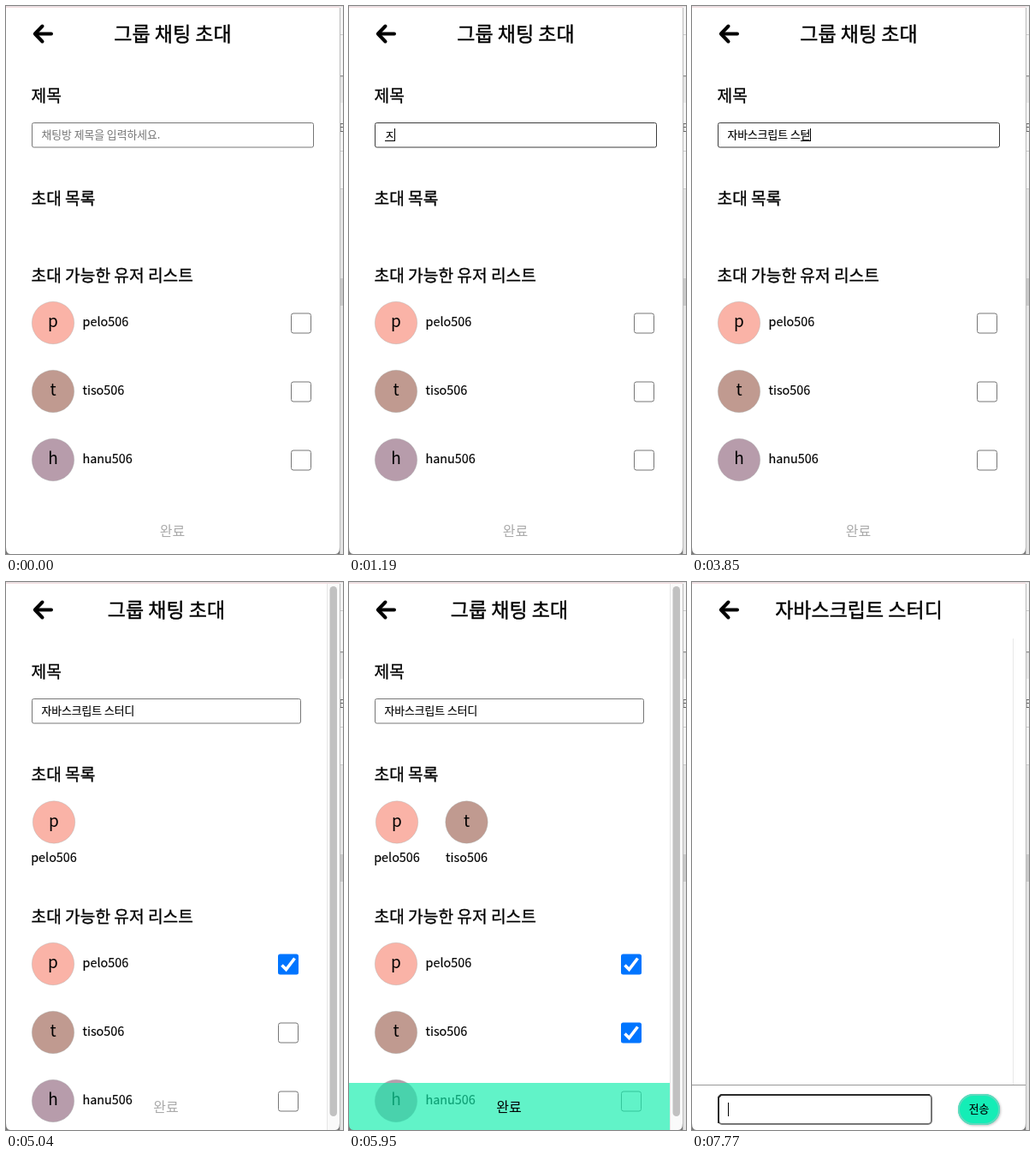
An HTML page with a canvas that plays this animation: 394 by 640 pixels, repeating every 8000 ms.

```html
<!DOCTYPE html>
<html lang="ko">
<head>
<meta charset="utf-8">
<style>
  html, body { margin: 0; width: 100%; height: 100%; overflow: hidden; background: #fff; }
  canvas { display: block; }
</style>
</head>
<body>
<canvas id="stage" width="394" height="640"></canvas>
<script>
const ctx = document.getElementById('stage').getContext('2d');
const FAMILY = '"Noto Sans CJK KR", "Noto Sans CJK", "Noto Sans KR", sans-serif';
const LOOP = 8000;
const ROOM = '자바스크립트 스터디';
const USERS = [
  { name: 'pelo506', color: '#fab3a7' },
  { name: 'tiso506', color: '#c09a90' },
  { name: 'hanu506', color: '#b79cab' },
];
const FOCUS = 910, BLUR = 4270, FIRST_PICK = 5040, SECOND_PICK = 5950;
const PRESS = 7210, CHAT = 7280, CARET_ON = 7770;

// Input contents while Hangul syllables are being composed
const TYPING = [
  [1120, 'ㅈ'], [1680, '자'], [1820, '잡'], [1890, '자바'], [2100, '자밧'],
  [2240, '자바스'], [2310, '자바슼'], [2380, '자바스크'], [2520, '자바스클'],
  [2590, '자바스크리'], [2660, '자바스크립'], [2870, '자바스크립ㅌ'],
  [3010, '자바스크립트'], [3080, '자바스크립트 '], [3150, '자바스크립트 ㅅ'],
  [3500, '자바스크립트 스'], [3640, '자바스크립트 슽'], [3780, '자바스크립트 스터'],
  [3850, '자바스크립트 스턷'], [3990, ROOM],
];

function rect(x, y, w, h, color) {
  ctx.fillStyle = color;
  ctx.fillRect(x, y, w, h);
}

function box(x, y, w, h, r, stroke, fill, width = 1) {
  ctx.beginPath();
  ctx.roundRect(x, y, w, h, r);
  if (fill) { ctx.fillStyle = fill; ctx.fill(); }
  if (stroke) { ctx.strokeStyle = stroke; ctx.lineWidth = width; ctx.stroke(); }
}

function line(points, color, width) {
  ctx.beginPath();
  points.forEach(([x, y]) => ctx.lineTo(x, y));
  ctx.strokeStyle = color;
  ctx.lineWidth = width;
  ctx.stroke();
}

// y is the visual middle of a Hangul syllable; weight thickens the strokes
function text(str, x, y, size, { color = '#000', align = 'left', weight = 0 } = {}) {
  ctx.font = `400 ${size}px ${FAMILY}`;
  ctx.textAlign = align;
  ctx.fillStyle = ctx.strokeStyle = color;
  const base = Math.round(y + size * 0.37);
  ctx.fillText(str, x, base);
  if (weight) {
    ctx.lineWidth = weight;
    ctx.strokeText(str, x, base);
  }
}

function avatar(user, x, y) {
  ctx.beginPath();
  ctx.arc(x, y, 24.7, 0, Math.PI * 2);
  ctx.fillStyle = user.color;
  ctx.fill();
  ctx.strokeStyle = 'rgba(160,170,165,.5)';
  ctx.lineWidth = 0.7;
  ctx.stroke();
  text(user.name[0], x, y - 2, 19, { align: 'center' });
}

function checkbox(x, y, checked) {
  if (!checked) return box(x - 11.5, y - 11.5, 23, 23, 2.5, '#767676', '#fff');
  box(x - 12, y - 12, 24, 24, 2.5, null, '#0075ff');
  line([[x - 7.5, y + 1], [x - 2.5, y + 6], [x + 7.5, y - 7]], '#fff', 3.6);
}

function backdrop() {
  rect(0, 0, 394, 640, '#fff');
  rect(390, 0, 4, 640, '#f4f4f4');
  rect(390, 82, 4, 31, '#e6e6e6');
  rect(390, 213, 4, 427, '#e4e4e4');
  rect(390, 318, 4, 32, '#c8c8c8');
  [33, 169, 213].forEach(y => rect(390, y, 4, 1, '#cbcbcb'));
  rect(390, 81, 4, 1.5, '#9a9a9a');
  text('E', 389, 142, 13, { color: '#666' });
}

function windowFrame() {
  rect(0, 0, 394, 1, '#e6dfe1');
  rect(0, 1, 390, 1, '#f3dde0');
  rect(390, 2, 1, 638, '#bbb');
  [[0, 1], [390, -1]].forEach(([x, side]) => {
    ctx.beginPath();
    ctx.moveTo(x, 632);
    ctx.quadraticCurveTo(x, 640, x + 5 * side, 640);
    ctx.lineTo(x, 640);
    ctx.fillStyle = '#777';
    ctx.fill();
  });
}

function header(title, center) {
  ctx.lineCap = ctx.lineJoin = 'round';
  line([[53, 32.5], [35, 32.5]], '#000', 4);
  line([[42.5, 23.5], [33.8, 32.5], [42.5, 41.5]], '#000', 4);
  ctx.lineCap = 'butt';
  ctx.lineJoin = 'miter';
  text(title, center, 32.2, 23, { align: 'center', weight: 0.4 });
}

function titleInput(t, width) {
  const focused = t >= FOCUS && t < BLUR;
  box(30.5, 136.5, width - 1, 28.5, 2, focused ? '#3c3c3c' : '#767676', '#fff');
  const step = TYPING.findLast(([at]) => t >= at);
  const value = step ? step[1] : '';
  if (value) text(value, 41.5, 150.5, 12.8, { weight: 0.15 });
  else text('채팅방 제목을 입력하세요.', 41.5, 150.5, 12.8, { color: '#757575' });
  if (!focused) return;
  const caret = Math.floor(41.5 + (value ? ctx.measureText(value).width : 0));
  rect(caret, 143, 1, 15, '#000');
  if (value && !value.endsWith(' ')) rect(caret - 11, 157, 11, 1, '#000');
}

function inviteScreen(t) {
  const picked = t >= SECOND_PICK ? 2 : t >= FIRST_PICK ? 1 : 0;
  const width = picked ? 375 : 390;
  const shift = picked ? 76 : 0;
  const heading = { weight: 0.3 };

  header('그룹 채팅 초대', width / 2);
  text('제목', 29.5, 104.5, 19.2, heading);
  titleInput(t, width - 60);
  text('초대 목록', 29.5, 224.5, 19.2, heading);
  USERS.slice(0, picked).forEach((user, i) => {
    const x = 56 + i * 81.5;
    avatar(user, x, 280.5);
    text(user.name, x, 322, 14.4, { align: 'center', weight: 0.15 });
  });

  text('초대 가능한 유저 리스트', 29.5, 314.5 + shift, 19.2, heading);
  USERS.forEach((user, i) => {
    const y = 370 + shift + i * 80;
    avatar(user, 55, y);
    text(user.name, 89.5, y - 1, 14.4, { weight: 0.15 });
    checkbox(width - 45, y + 0.5, i < picked);
  });

  const ready = picked === 2;
  if (ready) rect(0, 585, 375, 55, 'rgba(20,237,174,.67)');
  if (t >= PRESS) {
    rect(289, 593, 53, 29, 'rgba(80,150,130,.2)');
    rect(289, 593, 29, 29, 'rgba(80,150,130,.12)');
  }
  text('완료', width / 2 - 0.5, 613, 16, { color: ready ? '#000' : '#aaa', align: 'center' });

  if (picked) {
    rect(375, 2, 15, 638, '#fafafa');
    rect(375, 2, 1, 638, '#e6e6e6');
    box(378.5, 5, 8.5, 619, 4.25, null, '#c1c1c1');
  }
}

function chatScreen(t) {
  header(ROOM, 195);
  rect(375, 66, 1, 521, '#e8e8e8');
  rect(0, 587, 390, 1, '#999');
  box(31, 599, 249, 34, 4, '#767676', '#fff', 2);
  line([[31, 632], [31, 602], [34, 599], [278, 599]], '#2b2b2b', 2);
  if (t >= CARET_ON) rect(42, 608, 1, 16, '#000');

  ctx.shadowColor = 'rgba(0,0,0,.25)';
  ctx.shadowBlur = 3;
  ctx.shadowOffsetX = ctx.shadowOffsetY = 1;
  box(311, 598, 49, 36, 18, null, '#14edb6');
  ctx.shadowColor = 'transparent';
  box(312, 599, 47, 34, 17, '#5fd9bd', null, 2);
  text('전송', 335.5, 615, 12.8, { align: 'center', weight: 0.15 });
}

function draw() {
  const t = performance.now() % LOOP;
  backdrop();
  rect(0, 0, 390, 640, '#fff');
  (t < CHAT ? inviteScreen : chatScreen)(t);
  windowFrame();
  requestAnimationFrame(draw);
}
draw();
</script>
</body>
</html>
```
